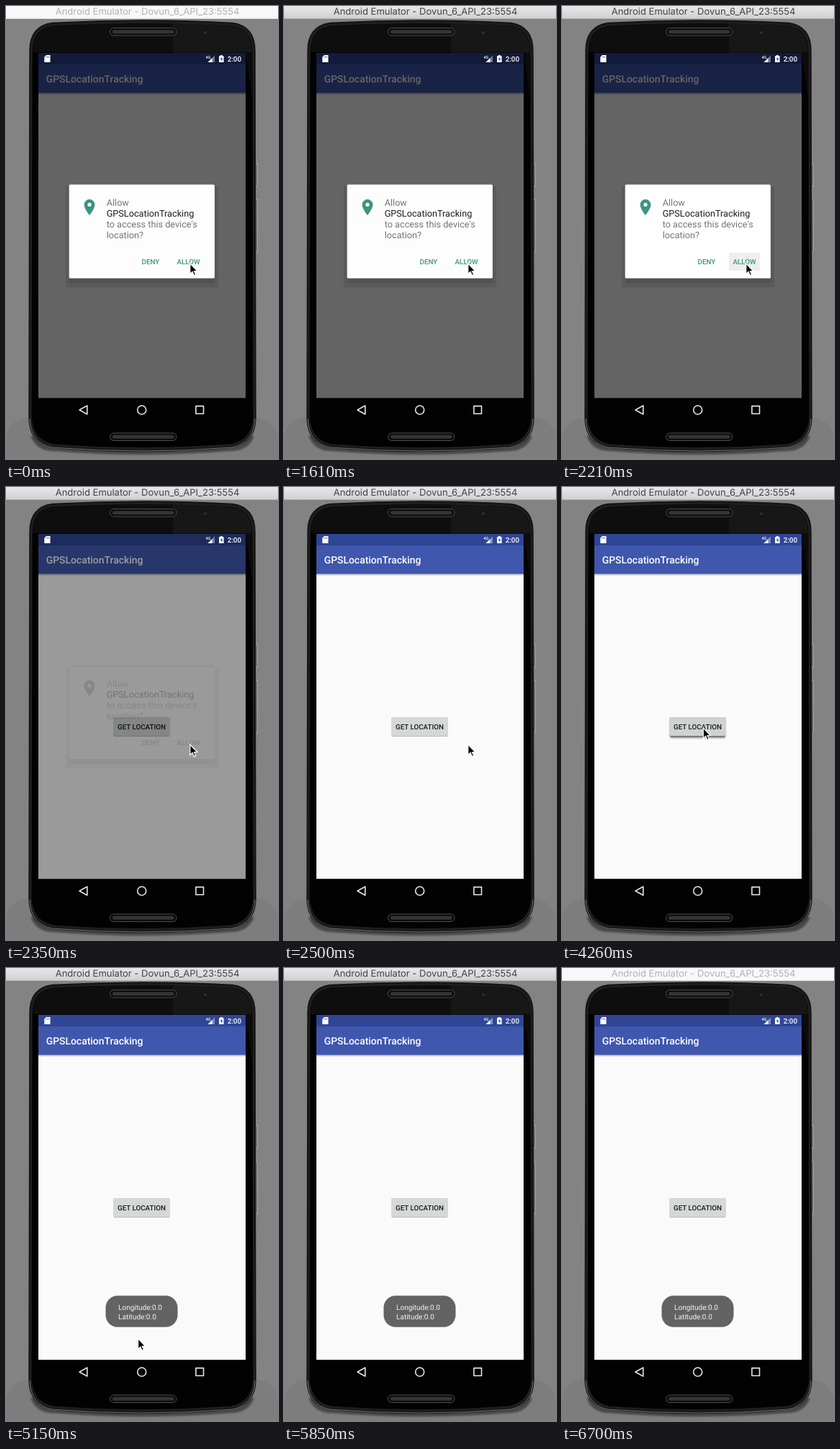
Write an HTML page that moves like this. It is 378 px wide and 628 px high and loops after 6.8 s.

```html
<!DOCTYPE html>
<html lang="en">
<head>
<meta charset="utf-8">
<title>Location permission demo</title>
<style>
  html, body { margin: 0; width: 100%; height: 100%; overflow: hidden; background: #838383; }
  svg { display: block; width: 378px; height: 628px; font-family: Roboto, sans-serif; text-rendering: geometricPrecision; }
  .medium { font-weight: 500; }
  .button { font-size: 9.8px; font-weight: 500; }
  .message { font-size: 12.7px; fill: #757575; }
  .accent { fill: #3c9483; }
  .fading .accent, .fading .message { fill: #5a5a5a; }
</style>
</head>
<body>
<svg viewBox="0 0 378 628">
  <defs>
    <linearGradient id="bar" x2="0" y2="1">
      <stop stop-color="#e8e8e8"/><stop offset="1" stop-color="#d0d0d0"/>
    </linearGradient>
    <linearGradient id="drop" x2="0" y2="1">
      <stop stop-opacity=".28"/><stop offset="1" stop-opacity="0"/>
    </linearGradient>
    <filter id="blur"><feGaussianBlur stdDeviation="1.2"/></filter>
    <g id="speaker">
      <rect x="144.5" width="92.5" height="10.5" rx="5.2" fill="#0c0c0c" stroke="#4c4c4c"/>
      <rect x="148" y="2.7" width="85.5" height="5" rx="2.5" fill="#343434"/>
    </g>
  </defs>

  <!-- Desktop and phone -->
  <rect width="378" height="628" fill="#838383"/>
  <rect y="571" width="378" height="80" rx="30" fill="#7d7d7d"/>
  <path d="M34 596Q42 617 66 617Q189 627 312 617Q337 617 345 596Z" fill="#484848" filter="url(#blur)"/>
  <path d="M347.5 218.5h2v31h-2M347.5 268.5h2v72h-2" fill="#666" stroke="#b4b4b4" stroke-width=".8"/>
  <path d="M33 62Q33 28 64 23.5Q189 16.5 315 23.5Q346 28 346 62L347 572Q346 606 314 612Q189 623 64 612Q33 606 32 572Z"
        fill="#1c1c1c" stroke="#111" stroke-width="1.4"/>
  <path d="M33 572Q34 606 64 612Q189 622 314 612Q345 606 346 572" fill="none" stroke="#8c8c8c" stroke-width=".8"/>
  <path d="M36 64Q36 31 65 27Q189 20 314 27Q343 31 343 64L344 570Q342 602 312 608Q189 617 66 608Q37 602 35 570Z"
        fill="#020202" stroke="#333" stroke-width=".6"/>
  <path d="M37 64Q37 32 65 28Q189 21 314 28Q342 32 342 64Z" fill="#0e0e0e"/>
  <path d="M232 24.5Q270 25 314 28Q342 32 342 64V130L333 65H232Z" fill="#fff" opacity=".04"/>
  <use href="#speaker" y="30.5"/>
  <use href="#speaker" y="592"/>
  <circle cx="277" cy="37" r="4" fill="#15151c"/>
  <circle cx="277" cy="37" r="2" fill="#2c2d45"/>

  <!-- App -->
  <rect x="45" y="65" width="288" height="478.2" fill="#fafafa"/>
  <rect x="45" y="65" width="288" height="16" fill="#2f4596"/>
  <rect x="45" y="81" width="288" height="39.5" fill="#3f57ad"/>
  <rect x="45" y="120.5" width="288" height="3" fill="url(#drop)"/>
  <text class="medium" x="55.7" y="106.3" font-size="13.9" fill="#fff">GPSLocationTracking</text>
  <rect id="lift" x="150" y="324" width="77" height="24" rx="2" opacity=".45" filter="url(#blur)"/>
  <rect x="149.5" y="320" width="78" height="26" rx="1.5" opacity=".25"/>
  <rect id="key" x="149" y="319" width="79" height="26" rx="1.5"/>
  <text class="button" x="188.5" y="335.5" text-anchor="middle" fill="#1c1c1c">GET LOCATION</text>
  <rect id="dim" x="45" y="65" width="288" height="478.2"/>

  <!-- System bars -->
  <g fill="#fff">
    <path d="M56 68h5.5v10h-8.2v-7.3Z"/>
    <path d="M55.8 70v1.8M57.6 69.4v2.4M59.4 69.4v2.4" stroke="#2f4596" stroke-width=".7"/>
    <text class="medium" x="277.5" y="72.6" font-size="5.4">4G</text>
    <path d="M290 68.5V78h-9.5Z" opacity=".4"/>
    <path d="M286.5 72V78h-6Z"/>
    <path d="M298 68h2.6v1.2h2V78h-6.6v-8.8h2Z"/>
    <path d="M299.8 70.6l-2 3.5h1.5v2.6l2-3.6h-1.5Z" fill="#2f4596"/>
    <text class="medium" x="307.7" y="76.6" font-size="9.8">2:00</text>
  </g>
  <g fill="none" stroke="#e4e4e4" stroke-width="1.6" stroke-linejoin="round">
    <path d="M102 560L112.8 554V566Z"/>
    <circle cx="188.7" cy="560" r="6"/>
    <rect x="263.9" y="554.6" width="10.6" height="10.6"/>
  </g>

  <!-- Permission dialog -->
  <g id="dialog">
    <path d="M83 250H295V390H83ZM88 247V377H290V247Z" opacity=".1" fill-rule="evenodd"/>
    <rect x="88" y="377" width="202" height="7" opacity=".1"/>
    <rect id="panel" x="87.7" y="247.4" width="202.2" height="130.1" rx="1.5" fill="#fdfdfd"/>
    <rect id="press" x="232" y="342" width="43" height="25" rx="2" fill="#eee"/>
    <path class="accent" fill-rule="evenodd"
          d="M116 268a7.4 7.4 0 0 0-7.4 7.4c0 5.6 7.4 14.6 7.4 14.6s7.4-9 7.4-14.6a7.4 7.4 0 0 0-7.4-7.4Zm0 4.8a2.6 2.6 0 0 1 0 5.2a2.6 2.6 0 0 1 0-5.2Z"/>
    <g class="message">
      <text x="139.7" y="277.3">Allow</text>
      <text x="139.7" y="292.2" fill="#1c1c1c">GPSLocationTracking</text>
      <text x="139.7" y="307.2">to access this device's</text>
      <text x="139.7" y="322.1">location?</text>
    </g>
    <g class="button accent">
      <text x="188.6" y="358">DENY</text>
      <text x="237.5" y="358">ALLOW</text>
    </g>
  </g>

  <!-- Toast -->
  <g id="toast" font-size="10.05" fill="#f4f4f4">
    <rect x="138.5" y="454.3" width="100" height="43.5" rx="16.5" fill="#636363"/>
    <text x="156" y="473.8">Longitude:0.0</text>
    <text x="156" y="487">Latitude:0.0</text>
  </g>

  <!-- Window title -->
  <rect id="titleBar" width="378" height="18"/>
  <rect id="titleLine" y="17" width="378" height="1"/>
  <text id="title" x="196.5" y="12" font-size="13" text-anchor="middle"
        font-family="Inter, sans-serif">Android Emulator - Dovun_6_API_23:5554</text>

  <path id="cursor" d="M0 0V14.5L3.3 11.4 5.5 16.6 7.9 15.6 5.7 10.5H10Z"
        stroke="#fff" stroke-width="1.2"/>
</svg>
<script>
const LOOP = 6800;
const el = id => document.getElementById(id);
const set = (id, attrs) => {
  for (const name in attrs) el(id).setAttribute(name, attrs[name]);
};

// Each step holds from its start time: [ms, ...values]
const cursorSteps = [
  [0, 255.8, 357], [3100, 201, 349], [3250, 198, 343], [3400, 196.3, 334],
  [5000, 196, 338], [5150, 183.6, 513.8], [5270, 183, 518], [5410, 185, 509],
  [5550, 220.3, 559.3], [5700, 290, 626], [5850, 400, 700]
];
const dimSteps = [[0, .6], [2350, .384], [2500, 0]];
const dialogSteps = [[0, 1], [2350, .3], [2500, 0]];
const toastSteps = [[0, 0], [4560, .5], [4710, 1]];

const at = (steps, t) => steps.findLast(step => step[0] <= t).slice(1);
const during = (t, start, end) => t >= start && t < end;

function draw(t) {
  const active = during(t, 1610, 6700);
  set('titleBar', { fill: active ? 'url(#bar)' : '#f8f8f8' });
  set('titleLine', { fill: active ? '#b4b4b4' : '#dcdcdc' });
  set('title', { fill: active ? '#434343' : '#b2b2b2' });

  const allowPressed = during(t, 2210, 2350);
  const fading = t >= 2350;
  set('dim', { opacity: at(dimSteps, t) });
  set('dialog', { opacity: at(dialogSteps, t), class: fading ? 'fading' : '' });
  set('panel', { fill: allowPressed ? '#fff' : '#fdfdfd', opacity: fading ? 0 : 1 });
  set('press', { opacity: allowPressed ? 1 : 0 });

  const buttonPressed = during(t, 4260, 4560);
  set('lift', { visibility: buttonPressed ? 'visible' : 'hidden' });
  set('key', { fill: buttonPressed ? '#d0d1d1' : '#d6d7d7' });
  set('toast', { opacity: at(toastSteps, t) });
  set('cursor', { transform: `translate(${at(cursorSteps, t)})` });
}

function tick() {
  draw(performance.now() % LOOP);
  requestAnimationFrame(tick);
}
tick();
</script>
</body>
</html>
```
